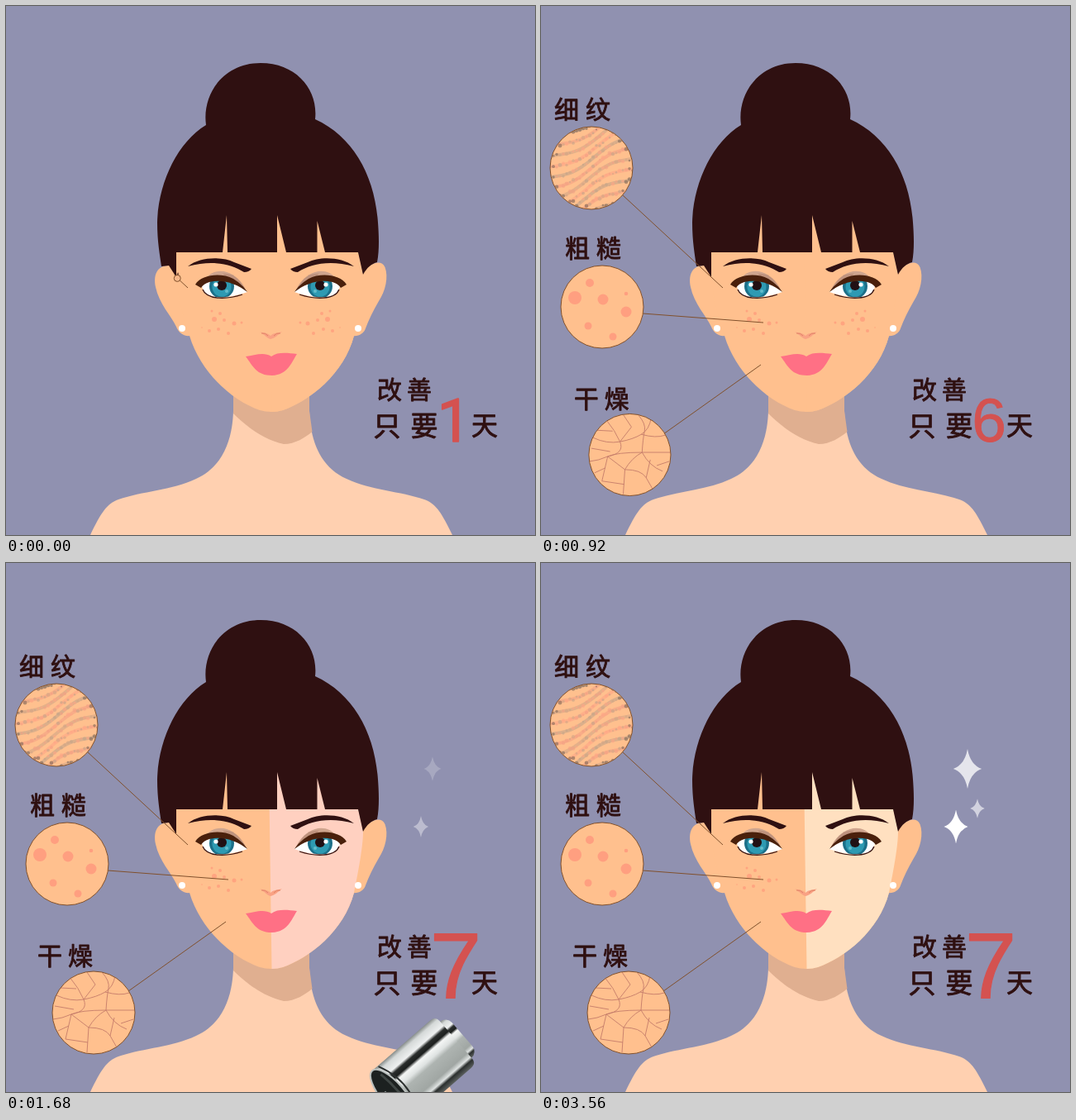
These frames come from a looping animation (640x640 px, 3.6 s). An HTML page:

```html
<!DOCTYPE html>
<html lang="zh">
<head>
<meta charset="utf-8">
<style>
html, body { margin: 0; width: 100%; height: 100%; overflow: hidden; background: #9091b0; }
svg { display: block; width: 100vw; height: 100vh; }
text { font: 500 30px "Noto Sans CJK SC", "Noto Sans CJK", sans-serif; fill: #2f1011; stroke: #2f1011;
  stroke-width: .9; stroke-linejoin: round; text-anchor: middle; }
#count { font: 75px "Liberation Sans", Arial, sans-serif; fill: #d45250; stroke: #d45250; stroke-width: .8; }
#count.one { font: 72px Roboto, sans-serif; stroke-width: 1.6; }
.line { fill: none; stroke: #80502c; stroke-width: 1; vector-effect: non-scaling-stroke; }
</style>
</head>
<body>
<svg viewBox="0 0 640 640">
  <defs>
    <linearGradient id="steel" x1="0" y1="0" x2="0" y2="1">
      <stop offset="0" stop-color="#868c8a"/><stop offset=".07" stop-color="#d5d9d8"/>
      <stop offset=".2" stop-color="#eef0f0"/><stop offset=".25" stop-color="#2a2d2c"/>
      <stop offset=".32" stop-color="#1c1f1e"/><stop offset=".37" stop-color="#f4f6f5"/>
      <stop offset=".47" stop-color="#dfe3e2"/><stop offset=".55" stop-color="#aeb4b1"/>
      <stop offset=".78" stop-color="#a0a6a3"/><stop offset=".86" stop-color="#dfe3e2"/>
      <stop offset=".91" stop-color="#2b2f2e"/><stop offset="1" stop-color="#5c615f"/>
    </linearGradient>
    <linearGradient id="glass" x1="0" y1="0" x2="0" y2="1">
      <stop offset="0" stop-color="#8d9493"/><stop offset=".2" stop-color="#dfe4e4"/>
      <stop offset=".45" stop-color="#f4f7f7"/><stop offset=".7" stop-color="#b7bfbe"/>
      <stop offset="1" stop-color="#7d8584"/>
    </linearGradient>
    <clipPath id="disc"><circle r="49.5"/></clipPath>
    <clipPath id="white"><path d="M236 337C246 329 272 328 292 346C276 352 250 356 240 347Z"/></clipPath>
  </defs>

  <rect width="640" height="640" fill="#9091b0"/>

  <!-- body -->
  <path fill="#ffd0b0" d="M102 640C115 613 122 602 136 597C165 587 200 586 230 572C262 558 274 525 275 490V462H367V490C368 525 380 558 412 572C442 586 477 587 506 597C520 602 527 613 540 640Z"/>
  <path fill="#e0af90" d="M275 460V493C290 508 312 525 336 530C350 530 362 522 370.500 515L367 490V460Z"/>

  <!-- head -->
  <g fill="#ffc08e">
    <path d="M205 314H197C183 314 178 325 181 340C185 360 200 375 206 388C209 396 216 400 223 399L250 340Z"/>
    <path d="M430 325C440 310 454 306 458.500 316C463 328 459 345 451 357C444 369 439 379 435 390C433 396 427 400 419 399L400 340Z"/>
    <path d="M206 250V328C208 355 214 375 222 399C236 445 275 478 307 489Q321 493 335 489C367 478 409 445 421 399C428 365 432 340 432 325L426 297V250Z"/>
  </g>
  <path id="half" d="M318 250L321.500 491Q329 491 335 489C367 478 409 445 421 399C428 365 432 340 432 325L426 297V250Z"/>
  <path fill="#2f1011" d="M242 144C237 108 262 69 308 69C352 69 378 102 374 137C420 158 446 205 450 262C451 275 452 295 449 310C442 312 437 316 432 325L426 298H386L376.500 260V298H339L328 253V298H268L267 253L262 298H206V328L197 314L188 315C186 300 183 285 183 262C184 215 207 165 242 144Z"/>
  <g fill="#fff"><circle cx="213" cy="390" r="4"/><circle cx="426" cy="390" r="4"/></g>

  <g id="eye">
    <path fill="#2f1011" d="M220 315C235 303 262 303 276 310L297 318Q294 322 288 322C272 312 250 307 220 315Z"/>
    <path fill="#cfa58e" d="M242 329C252 317 274 315 290 343L268 330Z"/>
    <path fill="#b38672" opacity=".6" d="M262 324C276 322 284 332 290 343L270 331Z"/>
    <path fill="#fff" d="M236 337C246 329 272 328 292 346C276 352 250 356 240 347Z"/>
    <g clip-path="url(#white)">
      <circle cx="261" cy="339" r="15" fill="#1c6f88"/>
      <circle cx="261" cy="340" r="11.500" fill="#2e9ab2"/>
      <circle cx="261" cy="338" r="6" fill="#211014"/>
      <circle cx="254" cy="337" r="2.600" fill="#fff"/>
      <circle cx="267" cy="345" r="2" fill="#62bccb"/>
    </g>
    <path fill="#4a200c" d="M229 337C236 325 260 322 275 330C283 335 288 340 292 346C279 336 262 330 246 334Q239 336 236 341Z"/>
    <path fill="none" stroke="#3a1512" stroke-width="1.300" d="M238 343C243 356 268 355 286 349"/>
  </g>
  <use href="#eye" transform="matrix(-1 0 0 1 641 0)"/>
  <g id="freckL" fill="#ffa480"></g>
  <use id="freckR" href="#freckL" transform="matrix(-1 0 0 1 641 0)"/>
  <path fill="#f9a284" d="M307 394C312 396 316 395 320 399C324 395 328 396 334 394C329 398 325 402 320 403C316 402 313 398 307 394Z"/>
  <path fill="none" stroke="#d97a5e" stroke-width=".8" d="M309 396Q314 395 317 399M332 396Q327 395 324 399"/>
  <path fill="#ff7085" d="M290 424C300 423 312 418 321 424C329 418 341 420 352 421C345 432 341 446 322 447C303 447 299 436 290 424Z"/>

  <g id="notes"></g>

  <text x="464 500" y="475">改善</text>
  <text x="461 506" y="519.500" style="font-size:33px">只要</text>
  <text x="579" y="518.500" style="font-size:32px">天</text>
  <text id="count"></text>

  <g id="stars" fill="#fff"></g>

  <g id="dropper">
    <g transform="translate(468 167) rotate(-41)">
      <rect x="84" y="-29" width="27" height="58" rx="10" fill="url(#steel)"/>
      <path fill="url(#steel)" d="M0 -38H92Q101 -38 101 -30V30Q101 38 92 38H0Z"/>
      <path fill="none" stroke="#2b2f2e" stroke-width="2" d="M9 -37Q27 0 9 37"/>
      <ellipse rx="14" ry="38" fill="#1c2120" stroke="#b9bfbd" stroke-width="2"/>
      <path fill="none" stroke="#3f4644" stroke-width="3" d="M5 -28Q10 0 5 28"/>
      <path fill="url(#glass)" d="M-4 -9V9H-160Q-172 8 -178 4H-186V-4H-178Q-172 -8 -160 -9Z"/>
      <path fill="none" stroke="#555d5b" stroke-width="2" d="M-112 9Q-122 2 -125 -4"/>
      <path fill="#fff" opacity=".8" d="M-8 -4H-155V-1H-8Z"/>
      <circle cx="-187" r="6.500" fill="#b9c0bf"/>
      <circle cx="-188" cy="1" r="3.500" fill="#39403f"/>
      <circle cx="-190" cy="-2" r="2" fill="#fff"/>
    </g>
  </g>
</svg>
<script>
const LOOP = 3600, STEP = 40;
const $ = id => document.getElementById(id);

function add(parent, tag, attrs, text) {
  const el = document.createElementNS('http://www.w3.org/2000/svg', tag);
  for (const k in attrs) el.setAttribute(k, attrs[k]);
  if (text) el.textContent = text;
  return parent.appendChild(el);
}
const dots = (parent, list) => list.forEach(([cx, cy, r]) => add(parent, 'circle', { cx, cy, r }));

let seed = 11;
const rand = () => (seed = seed * 16807 % 2147483647) / 2147483647;

// Piecewise linear lookup in [time, ...values] rows
function at(rows, t) {
  if (t <= rows[0][0]) return rows[0].slice(1);
  for (let i = 1; i < rows.length; i++) {
    const [a, b] = [rows[i - 1], rows[i]];
    if (t < b[0]) {
      const k = (t - a[0]) / (b[0] - a[0]);
      return a.slice(1).map((v, j) => v + (b[j + 1] - v) * k);
    }
  }
  return rows[rows.length - 1].slice(1);
}

dots($('freckL'), [[249, 369, 1.5], [259, 372, 2], [252, 379, 3], [264, 380, 2], [276, 384, 2.5],
  [285, 383, 1.5], [246, 393, 2], [257, 391, 2], [269, 396, 2], [237, 389, .8]]);

// Skin close-ups, drawn around the centre of a 50 px disc
function wrinkles(g) {
  const tones = ['#f4a184', '#d3a685', '#ffa586', '#c4a389'];
  const wave = (row, x) => row * 11.5 - x * .5 - 5 * Math.sin(x / 15 + row * .25);
  for (let row = -7; row <= 7; row++) {
    const tone = tones[(row + 8) % 4];
    let d = '';
    for (let x = -52; x <= 52; x += 4) d += `${d ? 'L' : 'M'}${x} ${wave(row, x).toFixed(1)}`;
    add(g, 'path', { d, fill: 'none', stroke: tone, 'stroke-width': 4, opacity: .6 });
    for (let x = -50; x <= 50; x += 4) {
      const y = wave(row, x) + rand() * 4 - 2, r = Math.hypot(x, y);
      if (r < 51) add(g, 'circle', { cx: x, cy: y, r: 1 + rand() * 1.5, opacity: .6,
        fill: r > 45 ? '#7d6657' : tones[rand() * 4 | 0] });
    }
  }
}
function spots(g) {
  g.setAttribute('fill', '#ff9f80');
  dots(g, [[-33, -11, 8], [-15, -29, 5], [1, -9, 6.5], [29, -16, 2.3], [29, 6, 6.5], [-17, 23, 4.5], [13, 36, 4.5]]);
}
function cracks(g) {
  add(g, 'path', { fill: 'none', stroke: '#c47c6a', 'stroke-width': .9,
    d: 'M-45 -21Q-28 -13 -12 -16T14 -25T26 -45M10 -49Q20 -38 18 -29T15 -3H50M-49 8Q-38 7 -27 2T15 -3Q24 14 40 20' +
       'M-29 -43Q-18 -30 -12 -16T-27 2L-34 32M-12 -16L2 -34L-8 -49M14 -25Q32 -20 43 -24M-27 2L-6 18L-8 48' +
       'M-6 18Q2 4 15 -3M-6 18Q14 18 20 28L28 42M20 28L25 6M-43 22L-30 16M-47 -8L-24 -4M-34 32L-7 36M-40 -30L-21 -29M33 13L48 8' });
}

const notes = [
  { from: [220, 341], to: [99, 229], c: [61, 196], label: '细纹', x: '31 69', y: 136, delay: 0, skin: wrinkles },
  { from: [269, 383], to: [123, 372], c: [74, 364], label: '粗糙', x: '44 82', y: 304, delay: 180, skin: spots },
  { from: [266, 434], to: [148, 518], c: [106, 544], label: '干燥', x: '53 90', y: 486, delay: 360, skin: cracks }
];
for (const n of notes) {
  n.el = add($('notes'), 'g', {});
  add(n.el, 'path', { class: 'line', d: `M${n.from}L${n.to}` });
  const disc = add(n.el, 'g', { transform: `translate(${n.c})` });
  add(disc, 'circle', { r: 50, fill: '#ffc08e' });
  n.skin(add(disc, 'g', { 'clip-path': 'url(#disc)' }));
  add(disc, 'circle', { r: 50, class: 'line' });
  add(n.el, 'text', { x: n.x, y: n.y }, n.label);
}
const pop = [[-40, 0], [0, .08], [200, .81], [280, 1.02], [340, 1.055], [390, 1.048], [480, 1], [560, .991], [640, 1]];
const grow = [[1020, .67], [1100, 1.06], [1180, 1.02], [1240, 1]];
const skin = [[1160, 255, 192, 142], [1360, 255, 192, 160], [1680, 255, 208, 192], [1880, 255, 224, 192]];

const stars = [
  { x: 516, y: 249, w: 20, h: 28, start: 1590, period: 590 },
  { x: 502, y: 319, w: 14.5, h: 20.5, start: 1500, period: 830 },
  { x: 528, y: 297, w: 11.5, h: 15.5, start: 1928, period: 600 }
];
for (const s of stars) {
  const { w, h } = s, a = w * .2, b = h * .2;
  s.el = add($('stars'), 'path', {
    d: `M0 ${-h}Q${a} ${-b} ${w} 0Q${a} ${b} 0 ${h}Q${-a} ${b} ${-w} 0Q${-a} ${-b} 0 ${-h}Z` });
}

function draw(t) {
  for (const n of notes) {
    const [s] = at(pop, t - n.delay), [x, y] = n.from;
    n.el.setAttribute('visibility', s > 0 ? 'visible' : 'hidden');
    n.el.setAttribute('transform', `translate(${x} ${y}) scale(${s}) translate(${-x} ${-y})`);
  }

  const day = Math.min(7, 1 + Math.floor(t / 170)), count = $('count');
  const size = day === 7 ? 1.5 * at(grow, t)[0] : 1;
  count.textContent = day;
  count.setAttribute('class', day === 1 ? 'one' : '');
  count.setAttribute('transform', `translate(${day === 7 ? 544 : 542} 527) scale(${size})`);

  $('half').setAttribute('fill', `rgb(${at(skin, t).map(Math.round)})`);
  $('freckR').setAttribute('opacity', at([[1160, 1], [1340, 0]], t)[0]);

  const falling = t >= 1120 && t < 1800;
  $('dropper').setAttribute('visibility', falling ? 'visible' : 'hidden');
  $('dropper').setAttribute('transform', `translate(0 ${(t - 1360) * 1.4875})`);

  for (const s of stars) {
    const v = t < s.start ? 0 : .5 - .5 * Math.cos((t - s.start) / s.period * 2 * Math.PI);
    s.el.setAttribute('opacity', v);
    s.el.setAttribute('transform', `translate(${s.x} ${s.y}) scale(${.4 + .6 * v})`);
  }
}

const begin = performance.now();
function tick() {
  const t = (performance.now() - begin) % LOOP;
  draw(Math.floor(t / STEP) * STEP);
  requestAnimationFrame(tick);
}
tick();
</script>
</body>
</html>
```
